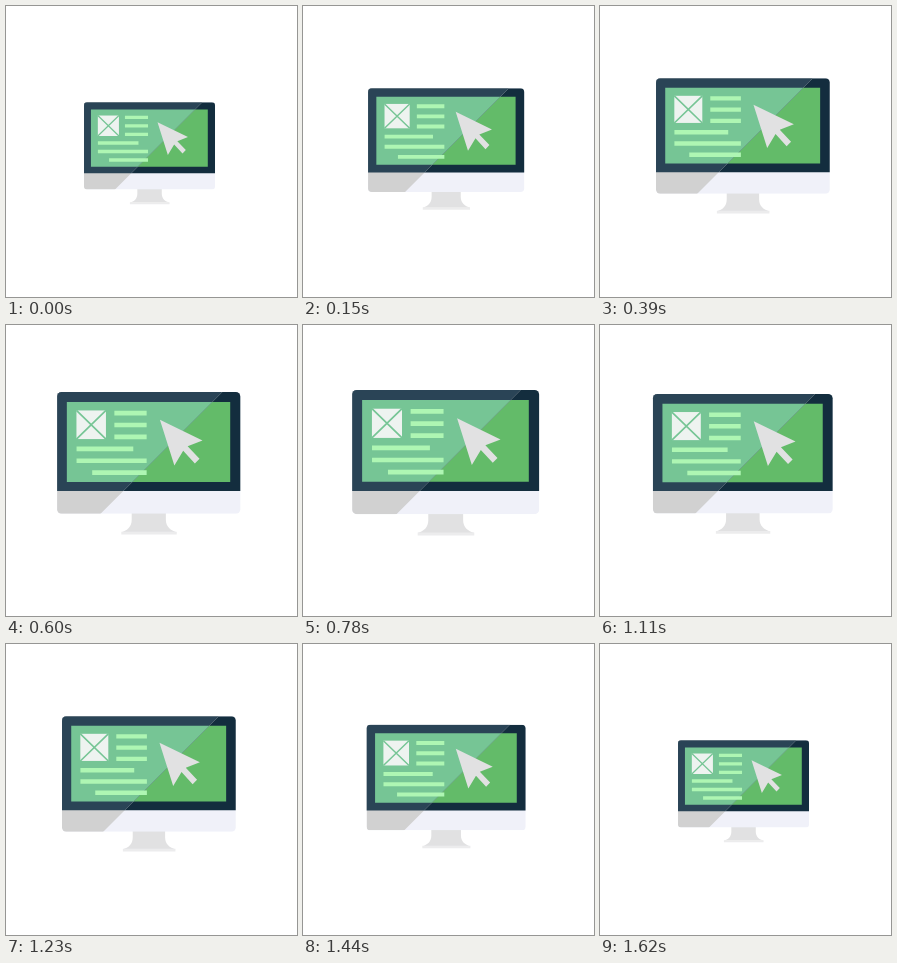
An HTML page that plays this animation: 291x291 px, repeating every 1.65 s.

```html
<!DOCTYPE html>
<html lang="en">
<head>
<meta charset="utf-8">
<title>Pulsing monitor</title>
<style>
  html, body { margin: 0; height: 100%; overflow: hidden; background: #fff; }
  svg { display: block; width: 100%; height: 100%; }
</style>
</head>
<body>
<svg viewBox="0 0 291 291">
  <defs>
    <clipPath id="shade"><path d="M40 56H227L84 199H40Z"/></clipPath>
    <clipPath id="case"><rect x="50.2" y="66" width="185" height="123" rx="4.5"/></clipPath>
  </defs>
  <g id="monitor">
    <path fill="#e1e1e2" d="M125.5 188V195C125.5 202 121 206 115 207.5H171C165 206 160 202 160 195V188Z"/>
    <path fill="#ececed" d="M115 207H171V210H115Z"/>
    <g clip-path="url(#case)">
      <path fill="#f0f1f9" d="M50 66H236V189H50Z"/>
      <path fill="#132d3e" d="M50 66H236V166H50Z"/>
      <path fill="#63bb69" d="M60 76H225V156.8H60Z"/>
      <g clip-path="url(#shade)">
        <path fill="#d1d1d1" d="M50 66H236V189H50Z"/>
        <path fill="#2a4456" d="M50 66H236V166H50Z"/>
        <path fill="#76c595" d="M60 76H225V156.8H60Z"/>
      </g>
    </g>
    <path fill="#eef3f0" d="M69.7 84.6H99.5V113.5H69.7Z"/>
    <path stroke="#76c595" stroke-width="1.7" d="M69.7 84.6L99.5 113.5M99.5 84.6L69.7 113.5"/>
    <path stroke="#aef6b3" stroke-width="4.6" d="M108 87.3H140.6M108 99.3H140.6M108 111.3H140.6M69.8 123.4H127.1M69.8 135.4H140.6M85.6 147.4H140.6"/>
    <path fill="#e1e1e2" d="M154 94L197 115L182 120.8L194 133.4L189.3 138.2L177.5 125.4L168.6 140.2Z"/>
  </g>
</svg>
<script>
const monitor = document.getElementById('monitor');
const LOOP = 1650, STEP = 30, PEAK = 810;
const MIN_WIDTH = 131, MAX_WIDTH = 187, BASE_WIDTH = 185;

// cubic-bezier(0, .38, .6, 1)
function ease(x) {
  let lo = 0, hi = 1;
  for (let i = 0; i < 30; i++) {
    const u = (lo + hi) / 2;
    if (1.8 * u * u * (1 - u) + u ** 3 < x) lo = u; else hi = u;
  }
  const u = (lo + hi) / 2, v = 1 - u;
  return 1.14 * u * v * v + 3 * u * u * v + u ** 3;
}

function draw(now) {
  const time = Math.floor((now % LOOP) / STEP) * STEP;
  const progress = 1 - Math.abs(time - PEAK) / PEAK;
  const width = MIN_WIDTH + (MAX_WIDTH - MIN_WIDTH) * (progress > 0 ? ease(progress) : 0);
  monitor.setAttribute('transform',
    `translate(145.5 170) scale(${width / BASE_WIDTH}) translate(-145.5 -170)`);
}

function tick(now) {
  draw(now);
  requestAnimationFrame(tick);
}
draw(0);
requestAnimationFrame(tick);
</script>
</body>
</html>
```
